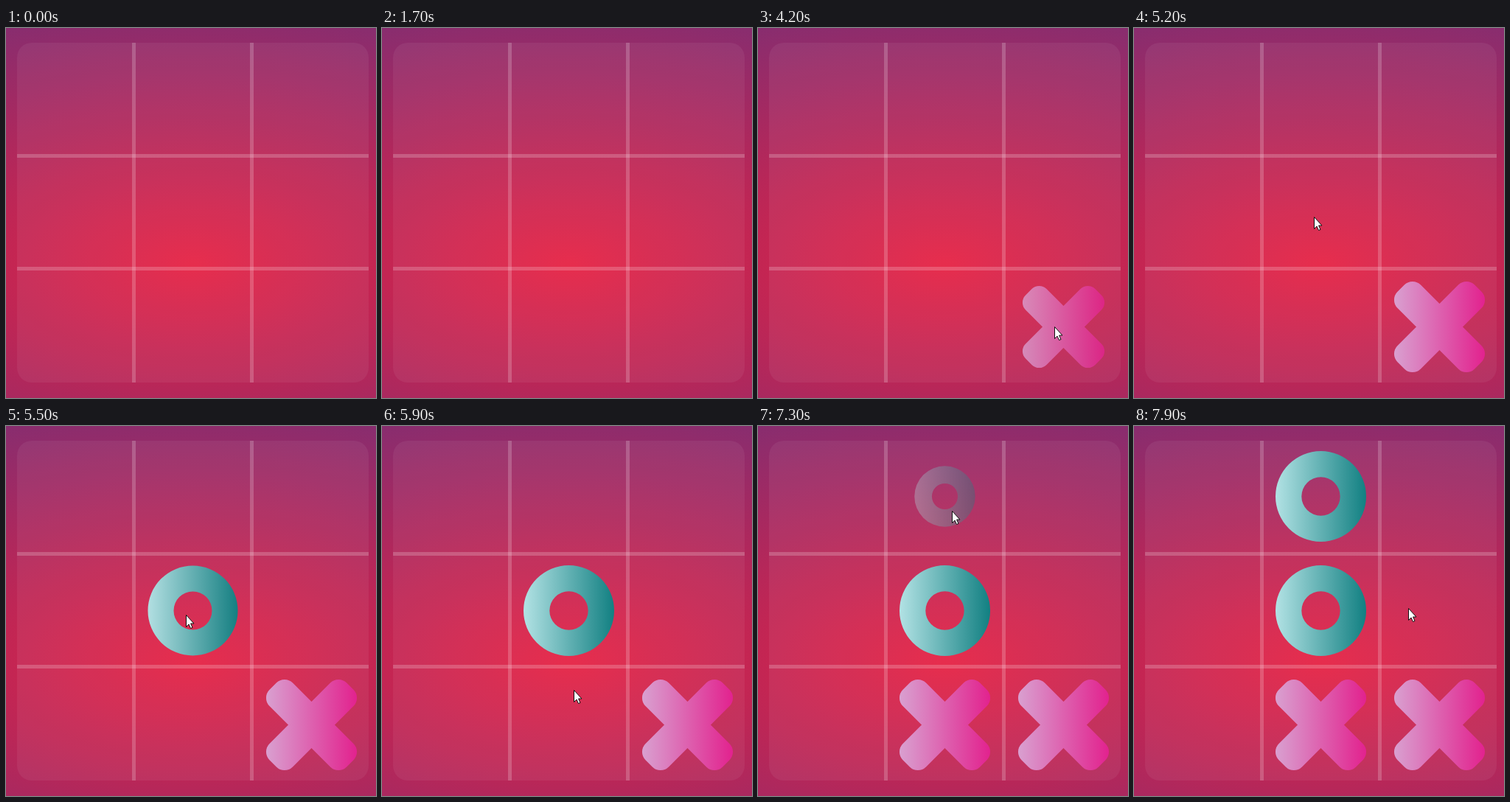
Write an HTML page with a canvas that moves like this. It is 502 px wide and 502 px high and loops after 8 s.

```html
<!DOCTYPE html>
<html lang="en">
<head>
<meta charset="utf-8">
<title>Noughts and crosses</title>
<style>
html, body { margin: 0; width: 100%; height: 100%; overflow: hidden; background: #8e2c6c; }
canvas { display: block; }
</style>
</head>
<body>
<canvas id="stage" width="502" height="502"></canvas>
<script>
const SIZE = 502, LOOP = 8000, POP = 300;
const ctx = document.getElementById('stage').getContext('2d');

const moves = [
  { mark: 'x', x: 414.5, y: 405.5, at: 4050 },
  { mark: 'o', x: 253.5, y: 250.5, at: 5250 },
  { mark: 'x', x: 253.5, y: 405.5, at: 6350 },
  { mark: 'o', x: 253.5, y: 95.5, at: 7235 }
];

// Pointer stops: time, x, y
const stops = [
  [3200, 488, 369], [3900, 402, 402], [4200, 402, 405], [4420, 402, 405],
  [4900, 244, 256], [5500, 244, 256], [5900, 260, 358], [6000, 258, 369],
  [6100, 255, 377], [6500, 255, 377], [7150, 263, 115], [7450, 263, 115],
  [7900, 372, 247]
];

const clamp = v => Math.min(1, Math.max(0, v));
const smooth = v => v * v * (3 - 2 * v);

// cubic-bezier(.25, .1, .25, 1)
function ease(p) {
  let lo = 0, hi = 1, u = p;
  for (let i = 0; i < 20; i++) {
    u = (lo + hi) / 2;
    const x = 0.75 * u * (1 - u) + u * u * u;
    if (x < p) lo = u; else hi = u;
  }
  return 0.3 * u * (1 - u) * (1 - u) + 3 * u * u * (1 - u) + u * u * u;
}

function sideways(from, to) {
  const g = ctx.createLinearGradient(-61.5, 0, 61.5, 0);
  g.addColorStop(0, from);
  g.addColorStop(1, to);
  return g;
}

const fills = {
  x: sideways('rgb(217,160,208)', 'rgb(226,34,142)'),
  o: sideways('rgb(178,226,228)', 'rgb(18,128,130)')
};

const glow = ctx.createRadialGradient(0, 0, 0, 0, 0, 345);
glow.addColorStop(0, 'rgb(229,33,67)');
glow.addColorStop(1, 'rgb(136,45,111)');

function drawBoard() {
  ctx.save();
  ctx.translate(253, 320);
  ctx.scale(2, 1);
  ctx.fillStyle = glow;
  ctx.fillRect(-253, -320, SIZE, SIZE);
  ctx.restore();

  ctx.fillStyle = 'rgba(255,255,255,.055)';
  ctx.beginPath();
  ctx.roundRect(15, 20, 477, 461, 20);
  ctx.fill();

  ctx.fillStyle = 'rgba(255,255,255,.2)';
  for (const x of [171, 331]) ctx.fillRect(x, 20, 5, 461);
  for (const y of [171, 324]) ctx.fillRect(15, y, 477, 5);
}

function drawMark({ mark, x, y, at }, t) {
  const p = ease(clamp((t - at) / POP));
  if (t <= at) return;
  ctx.save();
  ctx.translate(x, y);
  ctx.scale(0.5 + p / 2, 0.5 + p / 2);
  ctx.globalAlpha = p;
  ctx.fillStyle = fills[mark];
  ctx.beginPath();
  if (mark === 'x') {
    ctx.rotate(Math.PI / 4);
    ctx.roundRect(-74, -22.25, 148, 44.5, 15.7);
    ctx.roundRect(-22.25, -74, 44.5, 148, 15.7);
    ctx.rotate(-Math.PI / 4);
    ctx.fill();
  } else {
    ctx.arc(0, 0, 61.5, 0, 2 * Math.PI);
    ctx.closePath();
    ctx.moveTo(26.2, 0);
    ctx.arc(0, 0, 26.2, 0, 2 * Math.PI);
    ctx.fill('evenodd');
  }
  ctx.restore();
}

function pointerAt(t) {
  const i = stops.findIndex(s => s[0] > t);
  if (i < 0) return stops[stops.length - 1].slice(1);
  const [t0, x0, y0] = stops[i - 1], [t1, x1, y1] = stops[i];
  const p = smooth((t - t0) / (t1 - t0));
  return [x0 + (x1 - x0) * p, y0 + (y1 - y0) * p];
}

const arrow = new Path2D('M.5 .5V16.5L4 13L6.5 18.5L9 17.5L6.6 12H11Z');

function drawPointer(t) {
  if (t < stops[0][0]) return;
  const [x, y] = pointerAt(t);
  ctx.save();
  ctx.translate(Math.round(x), Math.round(y));
  ctx.fillStyle = '#fff';
  ctx.strokeStyle = '#111';
  ctx.lineWidth = 1;
  ctx.fill(arrow);
  ctx.stroke(arrow);
  ctx.restore();
}

function draw(t) {
  drawBoard();
  moves.forEach(m => drawMark(m, t));
  drawPointer(t);
}

const start = performance.now();
function tick() {
  draw((performance.now() - start) % LOOP);
  requestAnimationFrame(tick);
}
tick();
</script>
</body>
</html>
```
